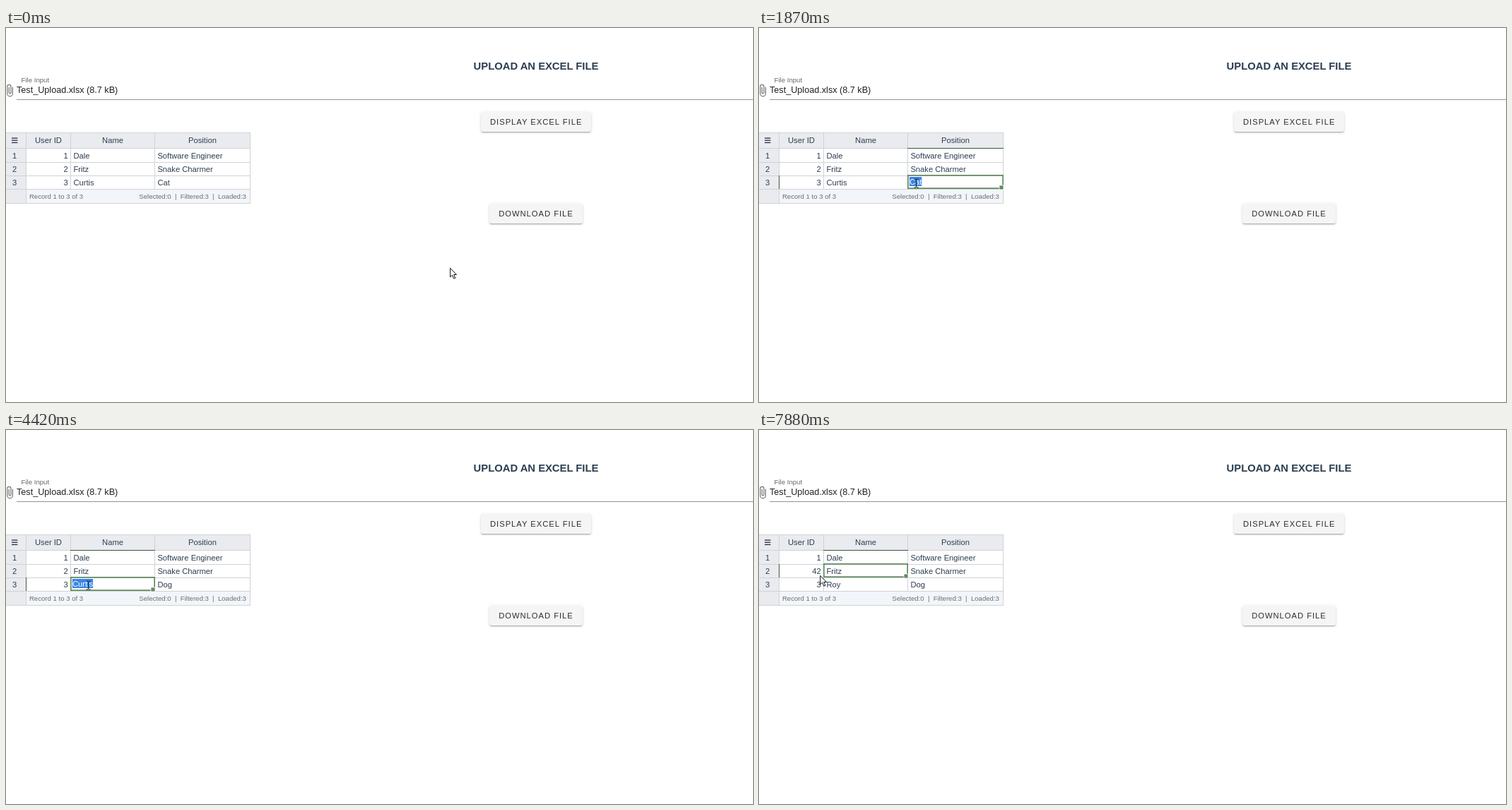
An HTML page that plays this animation: 1057x530 px, repeating every 8000 ms.

```html
<!DOCTYPE html>
<html lang="en">
<head>
<meta charset="utf-8">
<title>Upload form with editable table</title>
<style>
html, body { margin: 0; width: 100%; height: 100%; overflow: hidden; background: #fff; }
body { position: relative; }
svg { position: absolute; left: 0; top: 0; display: block; }
text { font: 11.2px "Liberation Sans", Arial, sans-serif; fill: #2c3e50; white-space: pre; }
.btn {
  position: absolute; height: 28.8px; border-radius: 3.2px; background: #f5f5f5;
  box-shadow: 0 2.4px .8px -1.6px rgba(0,0,0,.2), 0 1.6px 1.6px rgba(0,0,0,.14), 0 .8px 4px rgba(0,0,0,.12);
}
text.title { font-size: 14.8px; font-weight: bold; }
text.file { font-size: 12.65px; fill: rgba(0,0,0,.87); }
text.label { font-size: 9.6px; fill: rgba(0,0,0,.6); }
text.foot { font-size: 9.6px; fill: #6b6f73; }
text.caps { letter-spacing: 1px; fill: rgba(0,0,0,.82); }
</style>
</head>
<body>
<div class="btn" style="left:672px;top:118.6px;width:156px"></div>
<div class="btn" style="left:684.4px;top:248.6px;width:131.4px"></div>
<svg id="stage" width="1057" height="530" viewBox="0 0 1057 530"></svg>
<script>
const LOOP = 8000, TICK = 66.75;
const colX = [28, 91, 210, 345];
const rowY = i => Math.ceil(170 + 19.2 * i);
const baseY = i => 184.6 + 19 * i;
const stage = document.getElementById('stage');

function set(el, attrs) {
  for (const k in attrs) el.setAttribute(k, attrs[k]);
}
function add(tag, attrs) {
  const el = document.createElementNS('http://www.w3.org/2000/svg', tag);
  set(el, attrs);
  return stage.appendChild(el);
}
function rect(x, y, width, height, fill) {
  return add('rect', { x, y, width, height, fill });
}
function label(str, x, y, cls = '', anchor = 'start') {
  const el = add('text', { x, y, class: cls, 'text-anchor': anchor });
  el.textContent = str;
  return el;
}
function show(el, on) {
  el.style.display = on ? '' : 'none';
}

// Form
label('UPLOAD AN EXCEL FILE', 750, 59.3, 'title', 'middle');
label('File Input', 21.6, 77.4, 'label');
label('Test_Upload.xlsx (8.7 kB)', 15, 92, 'file');
rect(15, 101, 1042, 1, '#949494');
add('path', {
  d: 'M17.25 6V17.5A4.75 4.75 0 0 1 7.75 17.5V5A3.25 3.25 0 0 1 14.25 5V15.5A1.75 1.75 0 0 1 10.75 15.5V6',
  transform: 'translate(-4.4 79) scale(.8)', fill: 'none', stroke: '#757575', 'stroke-width': 1.5
});
label('DISPLAY EXCEL FILE', 685, 137, 'caps');
label('DOWNLOAD FILE', 697.2, 267, 'caps');

// Table
const HEAD = '#e9ebef', LINE = '#d0d2d5', DARK = '#3d553d', GREEN = '#628a62';
rect(0, 148, 346, 23, HEAD);
rect(0, 170, 28, 78, HEAD);
const footer = rect(28, 228, 318, 20);
[148, 248].forEach(y => rect(0, y, 346, 1, LINE));
for (let i = 0; i < 4; i++) rect(0, rowY(i), 346, 1, LINE);
colX.forEach((x, i) => rect(x, 148, 1, i % 3 ? 80 : 100, LINE));
for (let i = 0; i < 3; i++) rect(8, 155.4 + 3.2 * i, 8.4, 1.3, '#2c3040');
['User ID', 'Name', 'Position'].forEach((str, c) =>
  label(str, (colX[c] + colX[c + 1] + 1) / 2, 162.8, '', 'middle'));
label('Record 1 to 3 of 3', 32.9, 242.2, 'foot');
const gap = '\u00a0\u00a0';
label(['Selected:0', 'Filtered:3', 'Loaded:3'].join(gap + '|' + gap), 188.3, 242.2, 'foot');

const data = [
  ['1', 'Dale', 'Software Engineer'],
  ['2', 'Fritz', 'Snake Charmer'],
  ['3', 'Curtis', 'Cat']
];
const cells = data.map((row, r) => {
  label(r + 1, 12, baseY(r), '', 'middle');
  return row.map((str, c) => c
    ? label(str, colX[c] + 4.4, baseY(r))
    : label(str, 87.8, baseY(r), '', 'end'));
});

// Selection and cell editor
const headMark = rect(0, 170, 0, 1, DARK);
const rowMark = rect(28, 0, 1, 19, DARK);
const box = add('rect', { stroke: GREEN, 'stroke-width': 1.7, fill: 'none' });
const knob = add('rect', { width: 6, height: 6, fill: GREEN, stroke: '#fff', 'stroke-width': .8 });
const mark = rect(0, 0, 0, 13, '#3a86e8');
const typed = label('', 0, 0);
const caret = rect(0, 0, 1, 12, '#222');

// Pointer
const glow = add('circle', { r: 11.7, fill: '#fff000', 'fill-opacity': .6 });
const pointers = {
  arrow: add('path', {
    d: 'M0 0V12.6L2.9 9.9L5.1 14.9L7.2 14L5 9.2H8.9Z',
    fill: '#fff', stroke: '#111', 'stroke-width': 1, 'stroke-linejoin': 'round'
  }),
  cross: add('path', {
    d: 'M-2.2 -5.6H2.2V-2.2H5.6V2.2H2.2V5.6H-2.2V2.2H-5.6V-2.2H-2.2Z',
    fill: '#fff', stroke: '#000', 'stroke-width': 1.3
  }),
  beam: add('path', {
    d: 'M-3 -6H-1L0 -5.2L1 -6H3M0 -5.2V5.2M-3 6H-1L0 5.2L1 6H3',
    fill: 'none', stroke: '#111', 'stroke-width': 1
  })
};

// A cell is selected at `at`, opened by a double click at `open`, left at `end`
const edits = [
  { col: 2, row: 2, at: 1670, open: 1810, keys: { D: 2810, Do: 2870, Dog: 3340 }, end: 4150 },
  { col: 1, row: 2, at: 4150, open: 4360, keys: { R: 5080, Ro: 5210, Roy: 5540 }, end: 6280 },
  { col: 0, row: 1, at: 6280, open: 6550, keys: { 42: 7540 }, end: 7880 },
  { col: 1, row: 1, at: 7880, open: LOOP, keys: {}, end: LOOP, tabbed: true }
];

// Pointer moves: each starts where the one before ended
const moves = [
  { from: 467, to: 1068, x: 207, y: 225.7, bow: 100 },
  { from: 1068, to: 1468, x: 222.5, y: 220, bow: 3 },
  { from: 3410, to: 4138, x: 116.6, y: 220, bow: 7 },
  { from: 5490, to: 5674, x: 94, y: 234, bow: 0 },
  { from: 5674, to: 6141, x: 84.6, y: 199.6, bow: 0 },
  { from: 6342, to: 6475, x: 86.7, y: 206.3, bow: 0 }
];

function pointerAt(t) {
  const q = Math.floor((t + 6) / TICK) * TICK;
  let x = 628.6, y = 340.3;
  for (const m of moves) {
    if (q < m.from) break;
    const u = Math.min(1, (q - m.from) / (m.to - m.from));
    const f = u * u * (3 - 2 * u);
    x += (m.x - x) * f;
    y += (m.y - y) * f + m.bow * 4 * f * (1 - f);
  }
  return [x, y];
}

function pointerKind(x, y, sel) {
  if (x < 28 || x > 345 || y < 171 || y >= 228 || (sel && sel.tabbed)) return 'arrow';
  const inside = sel && x > colX[sel.col] && x < colX[sel.col + 1]
    && y > rowY(sel.row) && y < rowY(sel.row + 1);
  return inside ? 'beam' : 'cross';
}

function typedAt(edit, t) {
  return Object.keys(edit.keys).filter(k => t >= edit.keys[k]).pop();
}

function drawCells(t, sel) {
  const values = data.map(row => row.slice());
  for (const e of edits) {
    if (t >= e.end) values[e.row][e.col] = typedAt(e, t);
  }
  const open = !!sel && t >= sel.open;
  cells.forEach((row, r) => row.forEach((el, c) => {
    el.textContent = open && sel.row === r && sel.col === c ? '' : values[r][c];
  }));

  [headMark, rowMark, box, knob].forEach(el => show(el, sel));
  [mark, typed, caret].forEach(el => show(el, open));
  if (!sel) return;

  const x = colX[sel.col], right = colX[sel.col + 1] + 1;
  const y = rowY(sel.row) - 1, bottom = rowY(sel.row + 1);
  set(headMark, { x, width: right - x });
  set(rowMark, { y: y + 1 });
  set(box, { x: x + .85, y: y + .85, width: right - x - 1.7, height: bottom - y - 1.7 });
  set(knob, { x: right - 6, y: bottom - 5 });
  if (!open) return;

  const word = typedAt(sel, t);
  const tx = x + 2.9;
  typed.textContent = word || values[sel.row][sel.col];
  typed.style.fill = word ? '' : '#fff';
  set(typed, { x: tx, y: baseY(sel.row) - 1 });
  const w = typed.getComputedTextLength();
  show(mark, !word);
  show(caret, word);
  set(mark, { x: tx, y: y + 3, width: w });
  set(caret, { x: tx + w - .4, y: y + 3.5 });
}

function clicked(t) {
  return edits.some(e => !e.tabbed
    && (t >= e.at && t < e.at + 140 || t >= e.open && t < e.open + 60));
}

function render(t) {
  const sel = edits.find(e => t >= e.at && t < e.end);
  const [x, y] = pointerAt(t);
  drawCells(t, sel);
  const hover = x > 28 && x < 346 && y >= 228 && y < 248;
  set(footer, { fill: hover ? '#d3d3d3' : '#f2f5f9' });
  show(glow, clicked(t));
  set(glow, { cx: x - 2.5, cy: y - 1.5 });
  const kind = pointerKind(x, y, sel);
  for (const k in pointers) {
    show(pointers[k], k === kind);
    set(pointers[k], { transform: `translate(${x} ${y})` });
  }
}

const start = performance.now();
function loop() {
  render((performance.now() - start) % LOOP);
  requestAnimationFrame(loop);
}
loop();
</script>
</body>
</html>
```
